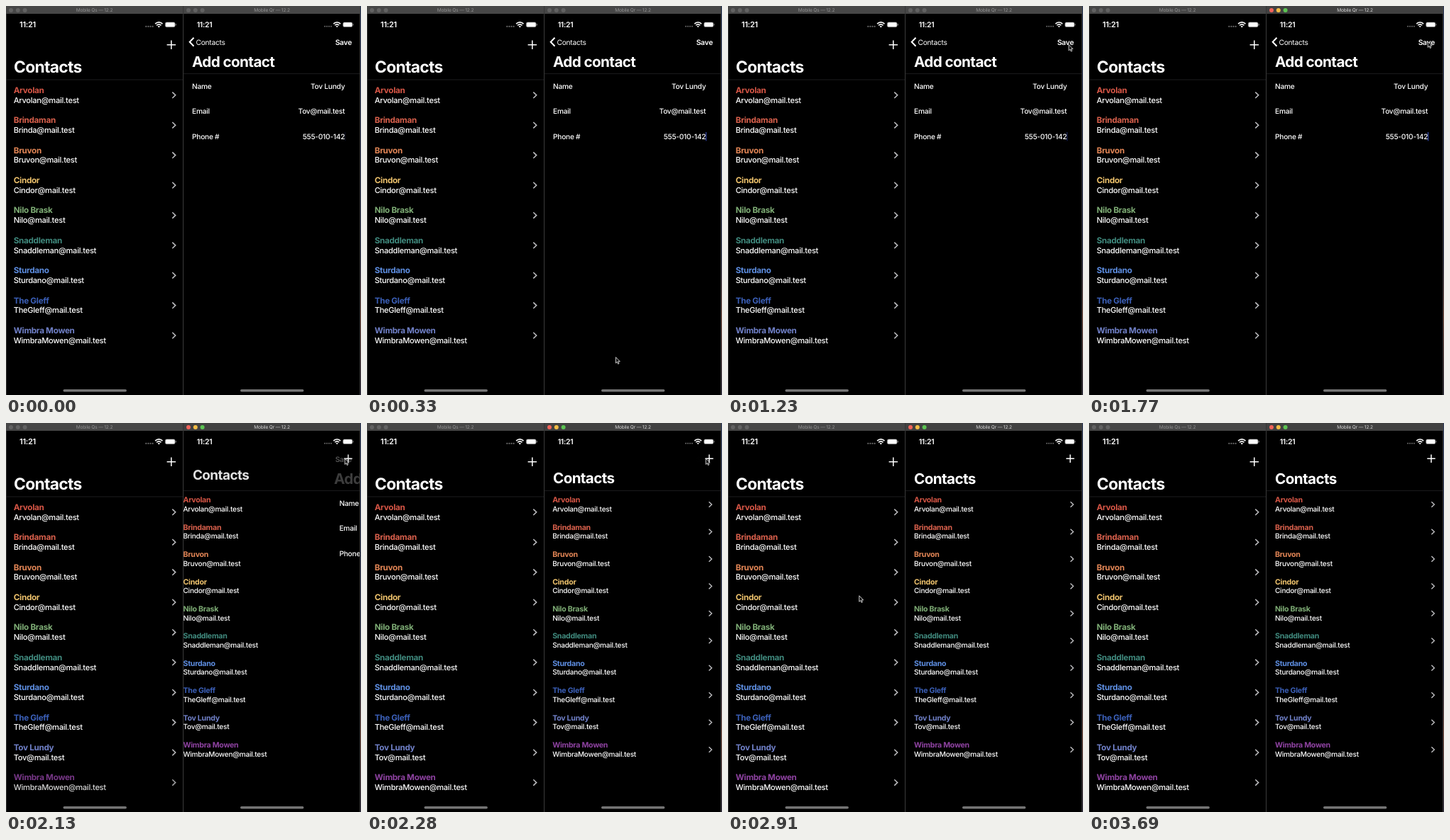
Recreate the animation shown at these times as an HTML page. Size 500x549 px, loop 3720 ms.

```html
<!DOCTYPE html>
<html lang="en">
<head>
<meta charset="utf-8">
<title>Contacts sync</title>
<style>
  html, body { margin: 0; height: 100%; overflow: hidden; background: #000; }
  svg { display: block; width: 500px; height: 549px; }
  text { font-family: Inter, "Liberation Sans", sans-serif; letter-spacing: -.025em; text-rendering: geometricPrecision; white-space: pre; }
  .large { font-weight: 700; letter-spacing: -.03em; }
</style>
</head>
<body>
<svg id="stage" viewBox="0 0 500 549"></svg>
<script>
const LOOP = 3720, ACTIVATE = 1500, SAVE = 1984, SYNC = 2030;
const COLORS = ["#d75646", "#d9604c", "#e38656", "#eec26c", "#7fae76",
                "#408a7e", "#5d8de0", "#3b5fb7", "#7080c8", "#8e42a1"];
const NEW_NAME = "Tov Lundy", DOMAIN = "@mail.test";
const people = [
  ["Arvolan"], ["Brindaman", "Brinda"], ["Bruvon"], ["Cindor"], ["Nilo Brask", "Nilo"],
  ["Snaddleman"], ["Sturdano"], ["The Gleff", "TheGleff"], [NEW_NAME, "Tov"],
  ["Wimbra Mowen", "WimbraMowen"]
];

const text = (x, y, size, str, attrs = "") =>
  `<text x="${x}" y="${y}" font-size="${size}" fill="#fff" ${attrs}>${str}</text>`;
const line = (d, width, color = "#fff", attrs = "") =>
  `<path d="${d}" fill="none" stroke="${color}" stroke-width="${width}" ${attrs}/>`;
const large = 'class="large"', semi = 'font-weight="600"', end = 'text-anchor="end"';

// k is the scale of a phone's interface
const row = ([name, user = name], i, x, y, k, chevronX) => {
  const mid = y + 3.1 * k;
  return `<g>${text(x, y, 11.7 * k, name, `font-weight="650" style="fill:${COLORS[i]}"`)}
    ${text(x, y + 13.9 * k, 11.1 * k, user + DOMAIN, 'font-weight="450"')}
    ${line(`M${chevronX} ${mid - 4.2 * k}l${4.4 * k} ${4.2 * k}l${-4.4 * k} ${4.2 * k}`, 1.5 * k, "#c0c0c3")}</g>`;
};
const list = (entries, x, y, pitch, k, chevronX) =>
  entries.map((p, i) => row(p, i, x, y + i * pitch, k, chevronX)).join("");

const plus = (x, y, r, attrs = "") => line(`M${x - r} ${y}h${2 * r}M${x} ${y - r}v${2 * r}`, 1.5, "#fff", attrs);

const statusBar = (x, k) => `
  ${text(x + 19, 30.1, 11 * k, "11:21", semi)}
  <g transform="translate(${x + 239.3} 26.3) scale(${k})">
    ${[-42, -38.9, -35.8, -32.7].map(cx => `<circle cx="${cx}" cy="2.6" r="1.1" fill="#666"/>`).join("")}
    ${line("M-29.2 -1.2q5.2 -4.6 10.4 0M-27.2 1q3.2 -2.8 6.4 0", 1.7)}
    <path d="M-25.7 2.4q1.7 -1.4 3.4 0l-1.7 1.7z" fill="#fff"/>
    <rect x="-15" y="-3.4" width="13.8" height="6.8" rx="2" fill="#fff" stroke="#777" stroke-width=".7"/>
    <rect x="-.5" y="-1.2" width="1" height="2.4" fill="#888"/>
  </g>`;

const titleBar = (x, title, active) => `
  <rect x="${x}" width="249" height="11" fill="${active ? "#414141" : "#474747"}"/>
  ${["#f2635a", "#f3bd45", "#5cc453"].map((c, i) =>
    `<circle cx="${x + 7 + i * 9.8}" cy="6" r="3" fill="${active ? c : "#626262"}"/>`).join("")}
  ${text(x + 124.5, 8.2, 6.6, title, `text-anchor="middle" style="fill:${active ? "#d8d8d8" : "#959595"}"`)}`;

const homeBar = x => line(`M${x} 542.7h86`, 3.4, "#747474", 'stroke-linecap="round"');

const field = (label, value, y) => text(262, y, 10.2, label, 'font-weight="450"')
  + text(477.3, y, 10.2, value, `font-weight="450" ${end}`);

const $ = id => document.getElementById(id);
$("stage").innerHTML = `
  <defs>
    <clipPath id="screen"><rect x="250" y="11" width="248.5" height="538"/></clipPath>
    <linearGradient id="desktop" x2="0" y2="1">
      <stop stop-color="#2c3a5e"/><stop offset=".65" stop-color="#2a2f4a"/>
      <stop offset=".8" stop-color="#75483a"/><stop offset="1" stop-color="#252336"/>
    </linearGradient>
  </defs>
  <rect width="500" height="549"/>
  <rect x="499" width="1" height="549" fill="url(#desktop)"/>
  ${titleBar(0, "Mobile Qs — 12.2", false)}
  ${statusBar(0, 1)}
  ${plus(232.8, 54.7, 6.2)}
  ${text(11, 94, 22.8, "Contacts", large)}
  ${line("M0 104h249", .8, "#242426")}
  <g id="before">${list(people.filter(p => p[0] !== NEW_NAME), 10.7, 122.7, 42.4, 1, 234.3)}</g>
  <g id="after">${list(people, 10.7, 122.7, 42.4, 1, 234.3)}</g>
  ${homeBar(82.2)}

  <g clip-path="url(#screen)">
    <g id="contacts">${list(people, 262, 112.2, 38.44, .907, 482.4)}</g>
    <g id="form">
      <rect x="250" y="96" width="249" height="453"/>
      ${field("Name", NEW_NAME, 116.7)}
      ${field("Email", "Tov" + DOMAIN, 152)}
      ${field("Phone #", "555-010-142", 187.6)}
      <rect id="caret" x="476.9" y="178" width="1.3" height="12.4" fill="#4b68ee"/>
    </g>
    ${line("M250 95.6h249", .8, "#242426")}
    <g id="addTitle">${text(262, 85.6, 20.7, "Add contact", large)}</g>
    ${line("M264.5 44.8l-5.8 6l5.8 6", 2, "#fff", 'id="back"')}
    ${text(0, 0, 10.2, "Contacts", 'id="backLabel"')}
    ${text(0, 0, 20.7, "Contacts", `id="bigLabel" ${large}`)}
    ${text(487, 54.6, 10.3, "Save", `id="save" ${semi} ${end}`)}
    ${plus(482, 50.2, 5.7, 'id="add"')}
    ${statusBar(249.7, .95)}
    ${homeBar(331.7)}
  </g>
  <g id="idle">${titleBar(250, "Mobile Qr — 12.2", false)}</g>
  <g id="active">${titleBar(250, "Mobile Qr — 12.2", true)}</g>
  ${line("M.3 11V549M249.6 0V549M498.6 0V549", .9, "#444")}
  <path id="pointer" d="M0 0V8.4L1.9 6.6L3.2 9.6L4.6 9L3.3 6.1H5.9Z" fill="#111" stroke="#ddd" stroke-width=".9"/>`;

// time, x, y
const pointerPath = [
  [250, 330, 565], [600, 480, 54.5], [1400, 480, 54.5], [1600, 477.2, 50],
  [2400, 477.2, 50], [2880, 185, 243.5], [2940, 184.6, 244], [3220, 90, 565]
];
const lerp = (a, b, p) => a + (b - a) * p;
const clamp = v => Math.min(1, Math.max(0, v));
const smooth = p => p * p * (3 - 2 * p);

function pointerAt(t) {
  const next = pointerPath.findIndex(k => k[0] > t);
  if (next < 1) return [-20, -20];
  const [t0, x0, y0] = pointerPath[next - 1], [t1, x1, y1] = pointerPath[next];
  const p = smooth((t - t0) / (t1 - t0));
  return [lerp(x0, x1, p), lerp(y0, y1, p)];
}

// Critically damped spring from 0 to 1
function spring(ms) {
  const s = Math.max(0, ms) * .022;
  return 1 - (1 + s) * Math.exp(-s);
}

const set = (id, name, value) => $(id).setAttribute(name, value);
const move = (id, x, y = 0, scale = 1) => set(id, "transform", `translate(${x} ${y}) scale(${scale})`);
const fade = (id, value) => set(id, "opacity", clamp(value));

function draw(t) {
  const p = spring(t - SAVE);
  move("contacts", -75 * (1 - p));
  move("form", 249 * p);
  move("addTitle", 240 * p);
  fade("addTitle", 1.4 * (1 - p));
  fade("back", 1 - 1.5 * p);
  fade("save", Math.sqrt(1 - p) - .1 * p);
  fade("add", p * 1.1);

  // The back label grows into the large title
  const x = lerp(267.5, 262, p), y = lerp(54.6, 85.6, p);
  move("backLabel", x, y, lerp(1, 2.07, p));
  move("bigLabel", x, y, lerp(.483, 1, p));
  fade("backLabel", 1 - 1.4 * p);
  fade("bigLabel", p * 1.06);

  fade("caret", .6 - .5 * Math.cos((t - 60) / 1000 * 2 * Math.PI));
  fade("before", +(t < SYNC));
  fade("after", +(t >= SYNC));
  $("after").lastElementChild.setAttribute("opacity", clamp((t - SYNC) / 120));
  fade("idle", +(t < ACTIVATE));
  fade("active", +(t >= ACTIVATE));
  move("pointer", ...pointerAt(t));
}

function tick() {
  draw(performance.now() % LOOP);
  requestAnimationFrame(tick);
}
tick();
</script>
</body>
</html>
```
